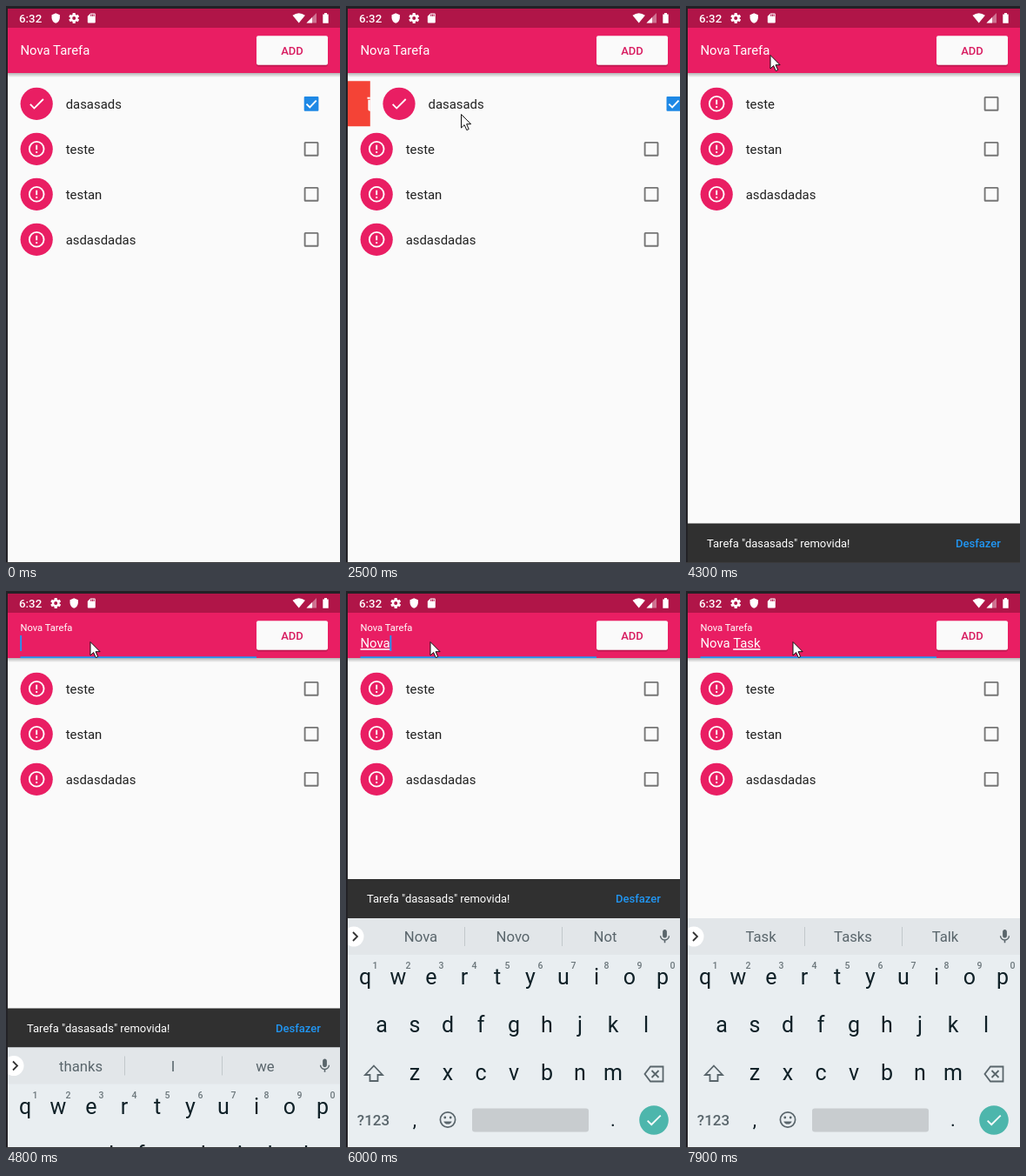
Recreate the animation shown at these times as an HTML page. Size 384 px wide and 640 px high, loop 8 s.

```html
<!DOCTYPE html>
<html lang="pt">
<head>
<meta charset="utf-8">
<title>Nova Tarefa</title>
<style>
html, body { margin: 0; width: 100%; height: 100%; overflow: hidden; background: #fafafa; }
svg { display: block; width: 384px; height: 640px; font-family: Roboto, sans-serif; }
text { white-space: pre; }
.mid { text-anchor: middle; }
.bold { font-weight: 500; }
</style>
</head>
<body>
<svg id="stage" viewBox="0 0 384 640" xmlns="http://www.w3.org/2000/svg"></svg>
<script>
const LOOP = 8000, STEP = 100, DP = 0.929;
const PINK = '#e91e63', BLUE = '#2196f3', INK = '#0f2027', GREY = '#59656b';

const ICONS = {
  check: 'M9 16.17L4.83 12l-1.42 1.41L9 19 21 7l-1.41-1.41z',
  alert: 'M11 15h2v2h-2zM11 7h2v6h-2zM12 2a10 10 0 1 0 0 20a10 10 0 1 0 0-20zM12 20a8 8 0 1 1 0-16a8 8 0 1 1 0 16z',
  trash: 'M6 19c0 1.1.9 2 2 2h8c1.1 0 2-.9 2-2V7H6zM19 4h-3.5l-1-1h-5l-1 1H5v2h14z',
  shield: 'M12 1L3 5v6c0 5.55 3.84 10.74 9 12 5.16-1.26 9-6.45 9-12V5z',
  card: 'M18 2h-8L4 8v12c0 1.1.9 2 2 2h12c1.1 0 2-.9 2-2V4c0-1.1-.9-2-2-2zM12 8h-2V4h2zM15 8h-2V4h2zM18 8h-2V4h2z',
  mic: 'M12 14c1.66 0 3-1.34 3-3V5c0-1.66-1.34-3-3-3S9 3.34 9 5v6c0 1.66 1.34 3 3 3zM17.3 11c0 3-2.54 5.1-5.3 5.1S6.7 14 6.7 11H5c0 3.41 2.72 6.23 6 6.72V21h2v-3.28c3.28-.48 6-3.3 6-6.72z'
};

// Markup helpers
const text = (x, y, size, fill, str, attr = '') =>
  `<text x="${x}" y="${y}" font-size="${size}" fill="${fill}" ${attr}>${str}</text>`;
const rect = (x, y, w, h, fill, attr = '') =>
  `<rect x="${x}" y="${y}" width="${w}" height="${h}" fill="${fill}" ${attr}/>`;
const line = (d, color, width, attr = '') =>
  `<path d="${d}" fill="none" stroke="${color}" stroke-width="${width}" ${attr}/>`;
const icon = (name, cx, cy, fill, scale = DP) =>
  `<path d="${ICONS[name]}" fill="${fill}" fill-rule="evenodd" transform="translate(${cx} ${cy}) scale(${scale}) translate(-12 -12)"/>`;

function gear() {
  const teeth = [0, 60, 120].map(a => rect(-1.6, -6, 3.2, 12, '#fff', `rx=".6" transform="rotate(${a})"`)).join('');
  return teeth + '<circle r="3.2" fill="#b01548" stroke="#fff" stroke-width="2.4"/>';
}

function row(name, i, done) {
  const y = 112.3 + 52 * i;
  const box = done
    ? rect(342.7, y - 8.3, 16.7, 16.7, '#1e88e5', 'rx="1"') + line(`M345.5 ${y + .3}l3.8 3.8l7.4-7.8`, '#fff', 1.9)
    : rect(343.6, y - 7.4, 14.9, 14.9, 'none', 'rx=".6" stroke="#757575" stroke-width="1.9"');
  return `<g id="row${i}"><circle cx="35.2" cy="${y}" r="18.6" fill="${PINK}"/>` +
    icon(done ? 'check' : 'alert', 35.2, y, '#fff') +
    text(68.7, y + 5.2, 14.9, '#212121', name) + box + '</g>';
}

function letters(str, x0, y) {
  return [...str].map((c, i) => text(x0 + 38 * i, y, 25, INK, c, 'class="mid key"')).join('');
}

function keyboard() {
  const hints = [...'1234567890'].map((c, i) =>
    text(33.5 + 38 * i, 434, 10.5, '#6b767b', c, 'class="mid bold"')).join('');
  return rect(2, 376, 382, 264, '#e9eef1') + rect(2, 376, 382, 42, '#e2e6e9') +
    '<circle cx="9" cy="397" r="11.5" fill="#fff"/>' + line('M8 392l5 5l-5 5', '#333', 1.8) +
    [86, 192, 298].map((x, i) => text(x, 403, 16.7, GREY, '', `id="hint${i}" class="mid"`)).join('') +
    line('M136.5 386v22M248.5 386v22', '#c2c8cb', 1) + icon('mic', 366.5, 397, GREY, .8) +
    letters('qwertyuiop', 22, 452) + hints + letters('asdfghjkl', 41, 507) + letters('zxcvbnm', 79, 562) +
    '<path id="shift" d="M32 545.5l10 10.5h-5.5v7h-9v-7h-5.5z" fill="none" stroke="#59656b" stroke-width="1.8"/>' +
    line('M350 546.5h14.500v17h-14.500l-6.500-8.500zM351.500 551l8 8m0-8l-8 8', GREY, 1.8) +
    text(31.5, 614, 17, GREY, '?123', 'class="mid bold"') +
    text(79, 615, 22, INK, ',', 'class="mid"') + text(307, 615, 22, INK, '.', 'class="mid"') +
    '<circle cx="117" cy="607.500" r="8.600" fill="none" stroke="#59656b" stroke-width="1.700"/>' +
    `<circle cx="113.800" cy="605" r="1.400" fill="${GREY}"/><circle cx="120.200" cy="605" r="1.400" fill="${GREY}"/>` +
    `<path d="M112.300 609.500h9.400a4.900 4.300 0 0 1-9.400 0z" fill="${GREY}"/>` +
    rect(145, 594.5, 134, 27, '#c8cccf', 'rx="3"') +
    '<circle cx="354" cy="608" r="16.800" fill="#4db6ac"/>' + icon('check', 354, 608, '#fff');
}

const stage = document.getElementById('stage');
stage.innerHTML = `<defs>
  <linearGradient id="shade" x2="0" y2="1"><stop stop-color="#000" stop-opacity=".28"/><stop offset="1" stop-color="#000" stop-opacity="0"/></linearGradient>
  <clipPath id="cut"><rect id="cutBox" x="2" y="86.300"/></clipPath></defs>` +
  rect(0, 0, 384, 640, '#fafafa') +
  `<g clip-path="url(#cut)">${rect(2, 86, 382, 53, '#f44336')}<g id="bin">${icon('trash', 31, 0, '#fff')}</g></g>` +
  row('dasasads', 0, true) + row('teste', 1) + row('testan', 2) + row('asdasdadas', 3) +
  rect(2, 77, 382, 5, 'url(#shade)') + rect(2, 25, 382, 52, PINK) + rect(2, 3, 382, 22, '#b01548') +
  text(15, 18.8, 13.3, '#fff', '6:32', 'class="bold"') +
  `<g id="shield">${icon('shield', 0, 14, '#fff', .52)}</g><g id="gear">${gear()}</g>` +
  icon('card', 98.3, 14, '#fff', .56) +
  '<path d="M329.500 10.800q7.200-5.200 14.400 0l-7.200 8.700z" fill="#fff"/>' +
  '<path d="M357 8v11.500h-11.500z" fill="#fff" opacity=".4"/><path d="M352 13v6.500h-6.500z" fill="#fff"/>' +
  '<path d="M364.300 9.500h1.700v-1.500h3v1.500h1.700v10.300h-6.400z" fill="#fff"/>' +
  rect(288, 35, 82, 34.5, '#000', 'rx="2" opacity=".18"') + rect(288, 34.3, 82, 33.5, '#fafafa', 'rx="2"') +
  text(329, 56, 13, '#d81b60', 'ADD', 'class="mid bold"') +
  rect(16.5, 75.3, 271.5, 1.8, BLUE, 'id="under"') +
  text(16.5, 0, 14.9, '#fff', 'Nova Tarefa', 'id="label"') +
  text(16.5, 65.3, 14.9, '#fff', '<tspan id="done"></tspan><tspan id="comp" text-decoration="underline"></tspan>', 'id="field"') +
  rect(0, 51, 1.9, 18, BLUE, 'id="caret"') +
  `<g id="snack">${rect(2, 0, 382, 46, '#303030')}<g id="snackText">` +
  text(24, 27.3, 13, '#fff', 'Tarefa "dasasads" removida!') +
  text(310, 27.3, 13, BLUE, 'Desfazer', 'class="bold"') + '</g></g>' +
  `<g id="keys">${keyboard()}</g>` +
  rect(0, 0, 384, 3, '#222126') + rect(0, 0, 2, 640, '#222126') + rect(0, 639, 384, 1, '#3a3a3c') +
  '<path id="mouse" d="M.500.500v15.500l3.600-3.400l2.700 6l2.400-1.100l-2.600-5.800h5z" fill="#fff" stroke="#111" stroke-width="1"/>';

const el = {};
stage.querySelectorAll('[id]').forEach(n => el[n.id] = n);
const keyNodes = [...stage.querySelectorAll('.key')].map(n => [n, n.textContent]);

// Motion tables: [time, ...values]
const MOUSE = [[500, 58, 2], [700, 42, 90], [1000, 30, 250], [1300, 52, 198], [1700, 58, 150],
  [2200, 80, 116], [2300, 86, 120], [2500, 132, 124], [2700, 205, 130], [3000, 268, 135],
  [3200, 286, 168], [3300, 290.5, 188], [3500, 260, 172], [3800, 135, 75], [4000, 93, 44], [4300, 96.5, 56],
  [4500, 96.5, 58], [7600, 96.5, 58], [7900, 122.5, 58]];
const DRAG = [[2300, 0], [2500, 25.8], [2600, 62], [2700, 122], [2800, 220], [3000, 382]];
const TYPED = [[0, '', '', 0], [4700, '', '', 1], [5200, '', '', 0], [5700, '', 'N', 1], [5800, '', 'No', 1],
  [6000, '', 'Nova', 1], [6200, 'Nova ', '', 1], [6600, 'Nova ', '', 0], [6800, 'Nova ', 'T', 1],
  [6900, 'Nova ', 'Ta', 1], [7200, 'Nova ', 'Task', 1], [7700, 'Nova ', 'Task', 0]];
const HINTS = [[0, 'thanks', 'I', 'we'], [5800, 'No', 'Now', 'Not'], [6000, 'Nova', 'Novo', 'Not'],
  [6200, 'and', 'Scotia', 'is'], [7000, 'Ta', 'Take', 'Table'], [7200, 'Task', 'Tasks', 'Talk']];

const clamp = v => Math.max(0, Math.min(1, v));
const span = (t, a, b) => clamp((t - a) / (b - a));
const mix = (a, b, k) => a + (b - a) * k;
const at = (table, t) => table.filter(s => s[0] <= t).pop().slice(1);

function track(table, t) {
  const i = table.findIndex(p => p[0] > t);
  if (i < 0) return table[table.length - 1].slice(1);
  if (i === 0) return table[0].slice(1);
  const [a, b] = [table[i - 1], table[i]], k = span(t, a[0], b[0]);
  return a.slice(1).map((v, j) => mix(v, b[j + 1], k));
}

function bezier(x1, y1, x2, y2) {
  const axis = (p, q, s) => 3 * p * s * (1 - s) ** 2 + 3 * q * s * s * (1 - s) + s ** 3;
  return x => {
    let lo = 0, hi = 1;
    for (let i = 0; i < 24; i++) {
      const m = (lo + hi) / 2;
      if (axis(x1, x2, m) < x) lo = m; else hi = m;
    }
    return axis(y1, y2, (lo + hi) / 2);
  };
}
const ease = bezier(.25, .1, .25, 1), swift = bezier(.4, 0, .2, 1);

const move = (n, x, y, extra = '') => n.setAttribute('transform', `translate(${x} ${y})${extra}`);
const show = (n, on) => n.setAttribute('visibility', on ? 'visible' : 'hidden');
const write = (n, s) => { if (n.textContent !== s) n.textContent = s; };

function render(t) {
  show(el.mouse, t >= 500);
  move(el.mouse, ...track(MOUSE, t));

  // Swipe away, then collapse the gap
  const [dx] = track(DRAG, t), gap = 52 * (1 - ease(span(t, 3228, 3408)));
  move(el.row0, dx, 0);
  show(el.row0, t < 3000);
  for (let i = 1; i < 4; i++) move(el['row' + i], 0, gap - 52);
  el.cutBox.setAttribute('width', dx);
  el.cutBox.setAttribute('height', gap);
  move(el.bin, 0, 86.3 + gap / 2);

  const swap = 21 * swift(span(t, 2850, 3250));
  move(el.shield, 57.2 + swap, 0);
  move(el.gear, 78.2 - swap, 14);

  // Field focus
  const focus = swift(span(t, 4450, 4650));
  move(el.label, 16.5 * .25 * focus, mix(56, 46.3, focus), ` scale(${mix(1, .75, focus)})`);
  el.under.setAttribute('opacity', focus);

  const rise = 1 - (1 - span(t, 4700, 5100)) ** 2, drop = 264 * (1 - rise);
  move(el.keys, 0, drop);
  show(el.keys, rise > 0);

  const into = span(t, 3450, 3700), out = span(t, 6657, 6907);
  const base = Math.min(639.5, 376 + drop);
  move(el.snack, 0, base - 45 * swift(into) * swift(1 - out));
  el.snackText.setAttribute('opacity', swift(span(into, .72, 1)));
  show(el.snack, into > 0 && out < 1);

  // Typing
  const [done, comp, caret] = at(TYPED, t);
  write(el.done, done);
  write(el.comp, comp);
  el.caret.setAttribute('x', 16.2 + (done + comp ? el.field.getComputedTextLength() : 0));
  show(el.caret, caret);
  at(HINTS, t).forEach((s, i) => write(el['hint' + i], s));

  const upper = t >= 5700 && t < 5800;
  keyNodes.forEach(([n, c]) => write(n, upper ? c.toUpperCase() : c));
  el.shift.setAttribute('fill', upper ? GREY : 'none');
}

const start = performance.now();
function tick() {
  const t = (performance.now() - start) % LOOP;
  render(Math.floor(t / STEP) * STEP);
  requestAnimationFrame(tick);
}
tick();
</script>
</body>
</html>
```
